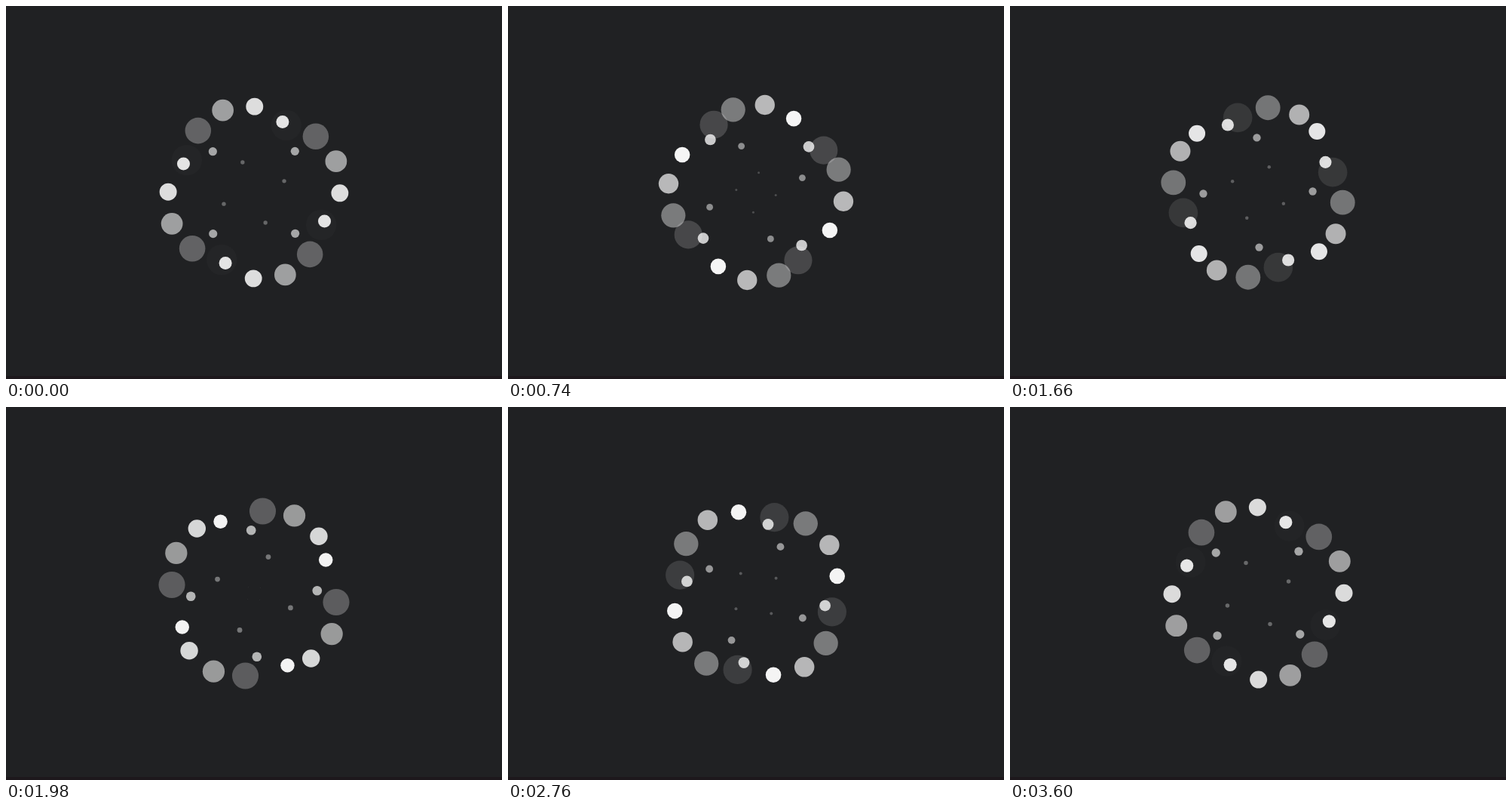
Animation, 658 px wide and 494 px high, one loop 3.62 s. Source, as an HTML page with a canvas:

```html
<!DOCTYPE html>
<html lang="en">
<head>
<meta charset="utf-8">
<title>Spiral loader</title>
<style>
  html, body { margin: 0; width: 100%; height: 100%; overflow: hidden; background: #202123; }
  canvas { display: block; }
</style>
</head>
<body>
<canvas id="stage" width="658" height="494"></canvas>
<script>
const ctx = document.getElementById("stage").getContext("2d");
const WIDTH = 658, HEIGHT = 494;
const CENTER = { x: 329, y: 247 };
const LOOP = 3620, STEP = 20;
const TRAVEL = 3611;      // ms for a dot to go from the rim to the centre
const ARMS = 4, DOTS = 7;
const SPACING = 0.146, START = 0.114;

// p runs from 1 at the rim to 0 at the centre.
function distance(p) {
  const s = 4 * p;
  return 10 + s * (76.766 + s * (-9.424 + s * (-2.767 + s * 0.425)));
}

function heading(p, index) {
  return 0.4 + index * 360 / (ARMS * DOTS) - 233 * p - 33.3 * (p - 0.66) ** 3;
}

function opacity(p) {
  return Math.min(0.1 + 1.92 * p, (1 - p) / 0.53, 1);
}

function drawDot({ p, index }) {
  const r = distance(p);
  ctx.fillStyle = `rgba(255, 255, 255, ${opacity(p)})`;
  for (let arm = 0; arm < ARMS; arm++) {
    const angle = (heading(p, index) + arm * 90) * Math.PI / 180;
    ctx.beginPath();
    ctx.arc(CENTER.x + r * Math.sin(angle), CENTER.y - r * Math.cos(angle),
            20 * p + 0.4, 0, 2 * Math.PI);
    ctx.fill();
  }
}

function draw(time) {
  ctx.fillStyle = "#202123";
  ctx.fillRect(0, 0, WIDTH, HEIGHT);
  ctx.fillStyle = "#1d181c";
  ctx.fillRect(0, 490, WIDTH, 4);

  const dots = Array.from({ length: DOTS }, (_, index) => {
    const phase = START + SPACING * index - time / TRAVEL;
    return { index, p: phase - Math.floor(phase) };
  });
  dots.sort((a, b) => b.p - a.p).forEach(drawDot);
}

const origin = performance.now();
function tick() {
  const elapsed = (performance.now() - origin) % LOOP;
  draw(Math.floor(elapsed / STEP) * STEP);
  requestAnimationFrame(tick);
}
tick();
</script>
</body>
</html>
```
